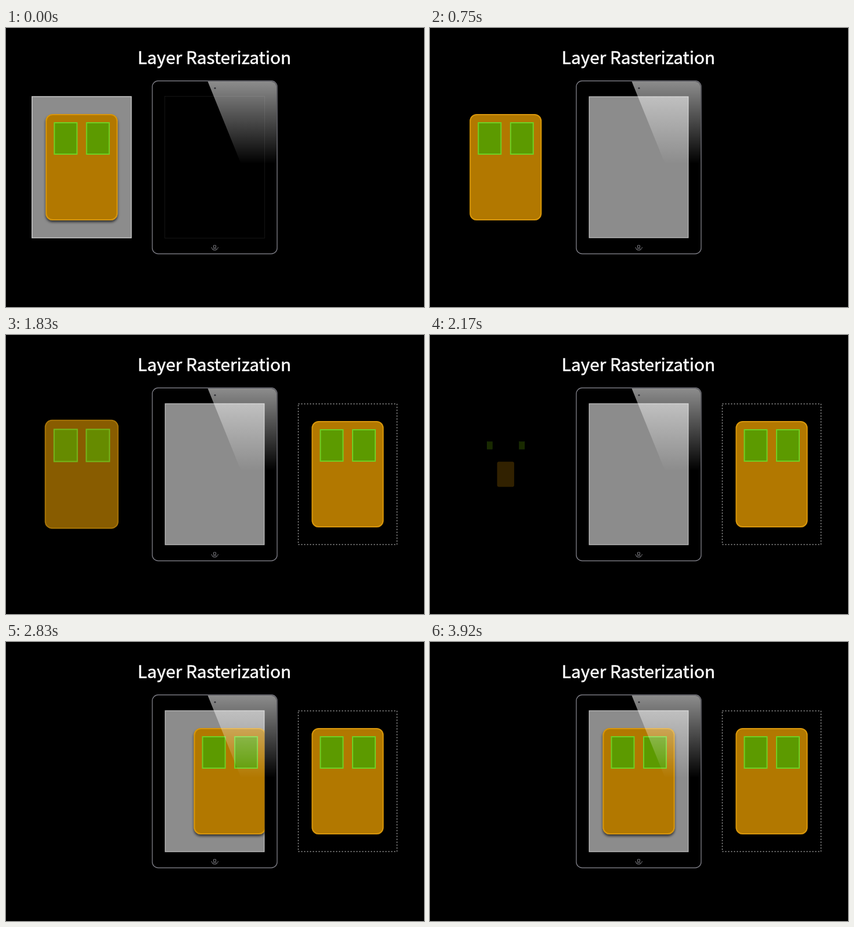
These frames come from a looping animation (720x480 px, 3960 ms). An HTML page:

```html
<!DOCTYPE html>
<html lang="en">
<head>
<meta charset="utf-8">
<title>Layer Rasterization</title>
<style>
  html, body { margin: 0; width: 100%; height: 100%; overflow: hidden; background: #000; }
  svg { display: block; width: 100vw; height: 100vh; }
  .title {
    font: 29.8px "Noto Sans CJK SC", "Noto Sans CJK JP", "Noto Sans CJK", Lato, sans-serif;
    fill: #fff; stroke: #fff; stroke-width: .5; text-anchor: middle;
  }
  .body { fill: #b27800; stroke: #d89608; stroke-width: 2; }
  .tile { fill: #5c9a00; stroke: #6fd024; stroke-width: 2; }
  .layer { fill: #8c8c8c; stroke: #c8c8c8; stroke-width: 1.5; }
  .line { fill: none; stroke: #787880; stroke-width: 1.4; }
  #original > * { transform-box: fill-box; transform-origin: center; }
</style>
</head>
<body>
<svg viewBox="0 0 720 480">
  <defs>
    <linearGradient id="shine" gradientUnits="userSpaceOnUse" x1="0" y1="92" x2="0" y2="234">
      <stop offset="0" stop-color="#fff" stop-opacity=".55"/>
      <stop offset="1" stop-color="#fff" stop-opacity="0"/>
    </linearGradient>
    <filter id="shadow" x="-20%" y="-20%" width="140%" height="140%">
      <feDropShadow dx="0" dy="3" stdDeviation="2" flood-color="#000" flood-opacity=".65"/>
    </filter>
    <!-- Card parts, relative to the card's centre -->
    <rect id="body" class="body" x="-61" y="-90.5" width="122" height="181" rx="11"/>
    <rect id="tileA" class="tile" x="-47" y="-76.5" width="39" height="54"/>
    <rect id="tileB" class="tile" x="8.5" y="-76.5" width="39" height="54"/>
    <g id="card">
      <use href="#body" filter="url(#shadow)"/>
      <use href="#tileA"/>
      <use href="#tileB"/>
    </g>
  </defs>

  <rect width="720" height="480"/>
  <text class="title" x="359" y="62">Layer Rasterization</text>

  <rect id="buffer" x="503.5" y="118.5" width="170" height="242" fill="none"
        stroke="#a0a0a0" stroke-width="1.5" stroke-dasharray="2 3"/>
  <rect id="layer" class="layer" x="-85.5" y="-121.5" width="171" height="243"/>
  <g id="original" transform="translate(130.3 239.5)">
    <use href="#body" filter="url(#shadow)"/>
    <use href="#tileA"/>
    <use href="#tileB"/>
  </g>
  <use id="rendered" href="#card"/>
  <use id="shown" href="#card"/>

  <g id="tablet">
    <path fill-rule="evenodd" d="M262 91H457a10 10 0 0 1 10 10V379a10 10 0 0 1-10 10H262a10 10 0 0 1-10-10V101a10 10 0 0 1 10-10Z
      M273.5 117.5V361.5H445.5V117.5Z"/>
    <rect x="273.5" y="117.5" width="172" height="244" fill="none" stroke="#666" stroke-opacity=".25" stroke-width=".8"/>
    <path fill="url(#shine)" d="M347.5 92H457a9 9 0 0 1 9 9V234H405Z"/>
    <rect class="line" x="252" y="91" width="215" height="297.5" rx="10"/>
    <circle cx="360" cy="103.5" r="1.6" fill="#333338"/>
    <path d="M354 377q1 5.500 5.500 5.500t6-5.500M356 380h7M357.500 374h4v4h-4z" fill="none" stroke="#77777c"/>
  </g>
</svg>

<script>
const LOOP = 3960, STEP = LOOP / 95;
const LEFT = 130.3, MIDDLE = 359.5, RIGHT = 588.5, CENTRE_Y = 239.5;
const el = id => document.getElementById(id);
const progress = (t, from, to) => Math.min(1, Math.max(0, (t - from) / (to - from)));
const ease = p => (1 - Math.cos(Math.PI * p)) / 2;

function slide(node, t, start, end, from, to) {
  const x = from + (to - from) * ease(progress(t, start, end));
  node.setAttribute("transform", `translate(${x} ${CENTRE_Y})`);
}

function show(node, visible) {
  node.setAttribute("visibility", visible ? "visible" : "hidden");
}

// Swells slowly, then collapses to nothing.
function popScale(t) {
  return t < 2030
    ? 1 + 0.23 * progress(t, 1600, 2030) ** 3.7
    : 1.23 * (1 - progress(t, 2030, 2200));
}

function draw(t) {
  slide(el("layer"), t, 0, 560, LEFT, MIDDLE);

  el("buffer").setAttribute("opacity", progress(t, 755, 1000));
  slide(el("rendered"), t, 770, 1260, LEFT, RIGHT);
  show(el("rendered"), t > 770);

  const scale = popScale(t);
  const opacity = 1 - 0.73 * progress(t, 1680, 2170);
  for (const part of el("original").children) {
    part.style.transform = `scale(${scale})`;
    part.style.opacity = opacity;
  }
  show(el("original"), scale > 0);

  slide(el("shown"), t, 2405, 2955, RIGHT, MIDDLE);
  show(el("shown"), t > 2405);
}

const start = performance.now();
function tick() {
  const t = (performance.now() - start) % LOOP;
  // Steps begin on rounded times, a few milliseconds early.
  draw(Math.min(94, Math.floor((t + 6) / STEP)) * STEP);
  requestAnimationFrame(tick);
}
tick();
</script>
</body>
</html>
```
